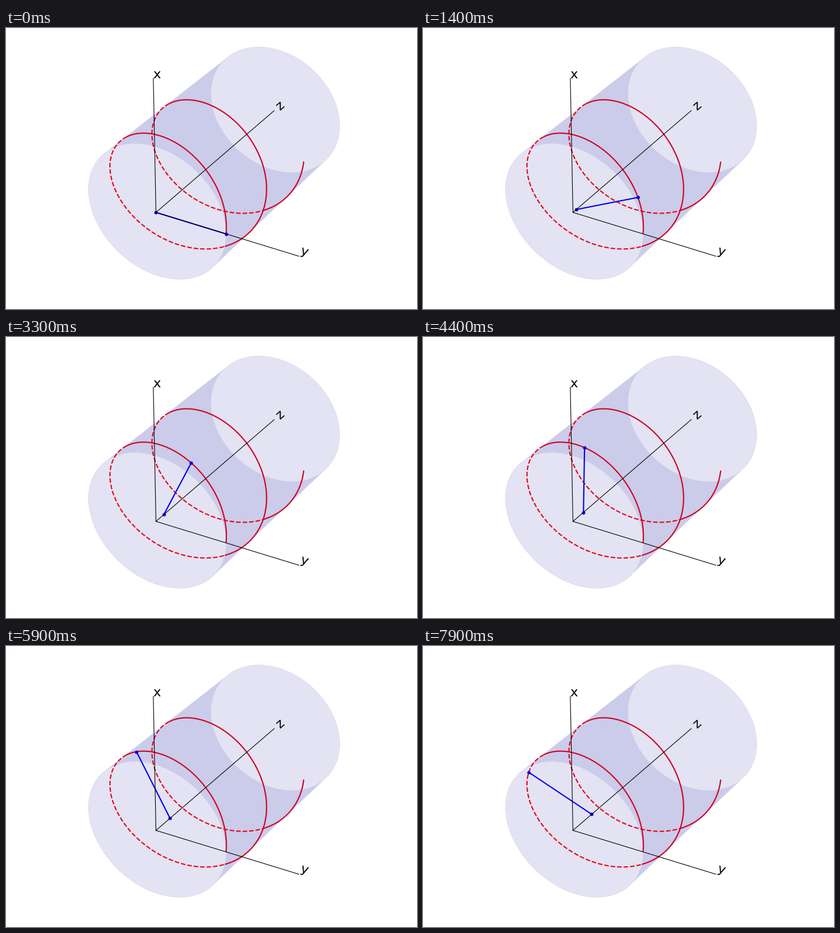
Recreate the animation shown at these times as a matplotlib script. Size 700 by 480 pixels, loop 8000 ms.

```python
import numpy as np
import matplotlib.pyplot as plt
from matplotlib.animation import FuncAnimation

W, H, DPI = 700, 480, 100
FRAMES, INTERVAL = 80, 100
STEP = 720 / 359                      # degrees per frame

# Perspective camera: elevation 30, azimuth -60
FOCAL, CX, CY = 3000, 356.1, 233.5
U0, V0 = -0.03357, -0.02717           # view coordinates of the origin
RY, RX = 0.0458, 0.0430               # cylinder radii along y and x
LENGTH = 0.1414                       # cylinder length along z
PITCH = 0.0935 / 720                  # helix rise per degree

LIGHT, DARK, RIM = "#e3e3f3", "#cbcbea", "#dddded"
RED, RED_HIDDEN, BLUE = "#cf0020", "#e60014", "#0000ee"


def project(y, z, x):
    u = U0 + 0.866 * y + 0.5 * z
    v = V0 - 0.25 * y + 0.433 * z + 0.866 * x
    depth = 1 - 0.433 * y + 0.75 * z - 0.5 * x
    return CX + FOCAL * u / depth, CY - FOCAL * v / depth


def wall(deg, z):
    t = np.radians(deg)
    return project(RY * np.cos(t), z, RX * np.sin(t))


def helix(deg):
    return wall(deg, PITCH * deg)


fig = plt.figure(figsize=(W / DPI, H / DPI), dpi=DPI, facecolor="white")
ax = fig.add_axes([0, 0, 1, 1])
ax.set_xlim(0, W)
ax.set_ylim(H, 0)
ax.axis("off")

# Cylinder: doubled wall between two open ends
near = wall(np.linspace(137.3, 324.7, 120), 0)
far = wall(np.linspace(-35.3, 137.3, 120), LENGTH)
ax.fill(np.r_[near[0], far[0]], np.r_[near[1], far[1]], fc=DARK, ec=RIM, lw=0.4)
for z in (0, LENGTH):
    ax.fill(*wall(np.linspace(0, 360, 240), z), fc=LIGHT, ec=RIM, lw=0.4)

# Helix: dashed where it runs behind the wall
for start, end, hidden in [(0, 130, False), (130, 300, True), (300, 490, False),
                           (490, 660, True), (660, 720, False)]:
    ax.plot(*helix(np.linspace(start, end, 150)), lw=1.5, zorder=3,
            color=RED_HIDDEN if hidden else RED,
            ls="--" if hidden else "-", solid_capstyle="butt")

rod, = ax.plot([], [], color=BLUE, lw=1.5, marker="o", ms=3.2,
               mfc="#0000dd", mec="#0000dd", zorder=4)

# Axes and their labels
origin = project(0, 0, 0)
for tip in [(0.0915, 0, 0), (0, LENGTH, 0), (0, 0, 0.0857)]:
    end = project(*tip)
    ax.plot([origin[0], end[0]], [origin[1], end[1]], color="black", lw=0.8, zorder=5)
for name, x, y, angle in [("x", 257, 80.5, 0), ("y", 508, 382, -17.3),
                          ("z", 467, 133, 41)]:
    ax.text(x, y, name, rotation=angle, fontsize=16, family="DejaVu Sans",
            ha="center", va="center", zorder=6)


def update(i):
    deg = i * STEP
    cx, cy = project(0, PITCH * deg, 0)
    tx, ty = helix(deg)
    rod.set_data([cx, tx], [cy, ty])
    return rod,


anim = FuncAnimation(fig, update, frames=FRAMES, interval=INTERVAL,
                     repeat=True, repeat_delay=0)
plt.show()
```
